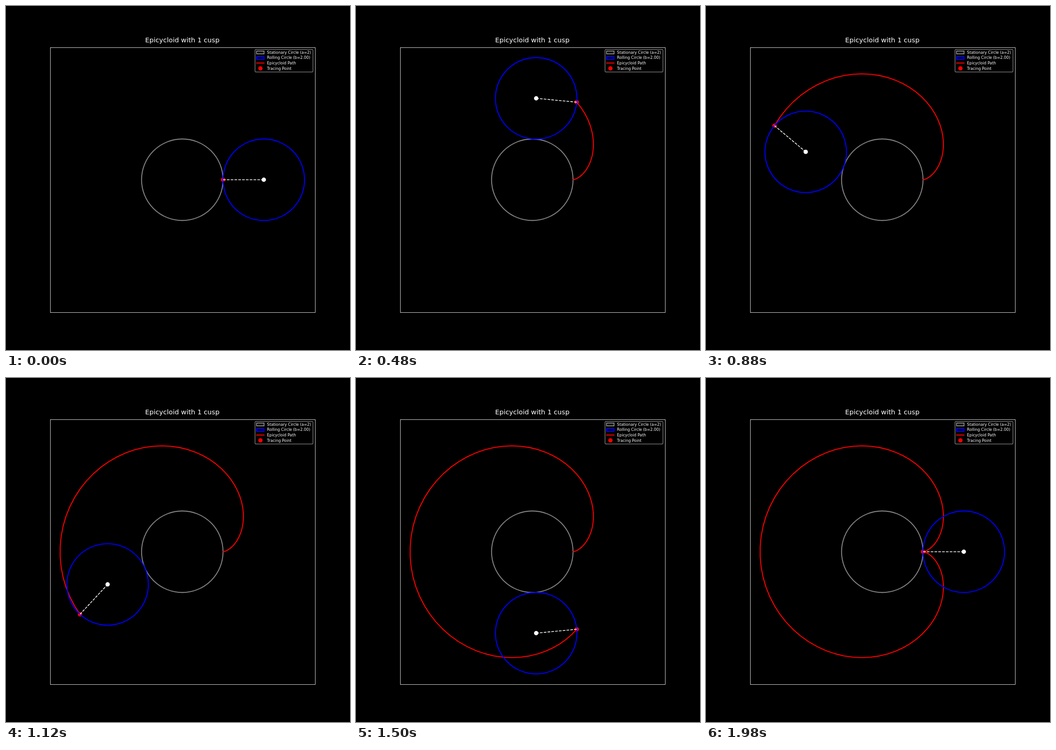
Animation of 748x748 px, one loop 2000 ms. Source, as an HTML page with a canvas:

```html
<!DOCTYPE html>
<html lang="en">
<head>
<meta charset="utf-8">
<title>Epicycloid</title>
<style>
html, body { margin: 0; width: 100%; height: 100%; overflow: hidden; background: #000; }
canvas { display: block; }
</style>
</head>
<body>
<canvas id="stage" width="748" height="748"></canvas>
<script>
const ctx = document.getElementById("stage").getContext("2d");
const TAU = 2 * Math.PI, STEPS = 100, STEP_MS = 20;
const CX = 383.35, CY = 377.74, R = 88.61;
const FONT = '"DejaVu Sans", Verdana, sans-serif';

const angle = i => TAU * i / (STEPS - 1);
const hub = a => [CX + 2 * R * Math.cos(a), CY - 2 * R * Math.sin(a)];
const tracer = a => [
  CX + R * (2 * Math.cos(a) - Math.cos(2 * a)),
  CY - R * (2 * Math.sin(a) - Math.sin(2 * a))
];

function circle([x, y], r, color, width) {
  ctx.beginPath();
  ctx.arc(x, y, r, 0, TAU);
  if (width) {
    ctx.strokeStyle = color;
    ctx.lineWidth = width;
    ctx.stroke();
  } else {
    ctx.fillStyle = color;
    ctx.fill();
  }
}

const dot = (p, color) => circle(p, 4.69, color);

function line(points, color, width, dash = []) {
  ctx.beginPath();
  points.forEach(p => ctx.lineTo(...p));
  ctx.strokeStyle = color;
  ctx.lineWidth = width;
  ctx.lineCap = dash.length ? "butt" : "square";
  ctx.lineJoin = "round";
  ctx.setLineDash(dash);
  ctx.stroke();
  ctx.setLineDash([]);
}

function box(x, y, w, h, color, width) {
  ctx.strokeStyle = color;
  ctx.lineWidth = width;
  ctx.lineJoin = "miter";
  ctx.strokeRect(x, y, w, h);
}

function text(s, x, y, size, align) {
  ctx.font = `${size}px ${FONT}`;
  ctx.textAlign = align;
  ctx.fillStyle = "#fff";
  ctx.fillText(s, x, y);
}

function legend() {
  ctx.beginPath();
  ctx.roundRect(541.5, 94.5, 126, 49, 1.67);
  ctx.fillStyle = "rgba(0,0,0,.8)";
  ctx.fill();
  ctx.strokeStyle = "rgba(204,204,204,.8)";
  ctx.lineWidth = 1.04;
  ctx.stroke();
  box(545, 98, 16, 6, "#808080", 2.08);
  box(545, 110, 16, 6, "#00f", 2.08);
  line([[545, 124], [561, 124]], "#f00", 2.08);
  dot([553.2, 135.6], "#f00");
  ["Stationary Circle (a=2)", "Rolling Circle (b=2.00)", "Epicycloid Path", "Tracing Point"]
    .forEach((s, i) => text(s, 567.6, 103.5 + 11.75 * i, 8.33, "left"));
}

function draw(step) {
  const a = angle(step), center = hub(a), tip = tracer(a);
  ctx.fillStyle = "#000";
  ctx.fillRect(0, 0, 748, 748);
  circle([CX, CY], R, "#808080", 2.08);
  if (step) line(Array.from({ length: step + 1 }, (_, i) => tracer(angle(i))), "#f00", 2.08);
  dot(tip, "#f00");
  circle(center, R, "#00f", 2.08);
  line([center, tip], "#fff", 1.56, [5.78, 2.5]);
  dot(center, "#fff");
  box(96.5, 90.5, 576, 576, "#fff", 0.83);
  text("Epicycloid with 1 cusp", CX, 79, 14.58, "center");
  legend();
}

function tick() {
  draw(Math.floor(performance.now() / STEP_MS) % STEPS);
  requestAnimationFrame(tick);
}
tick();
</script>
</body>
</html>
```
